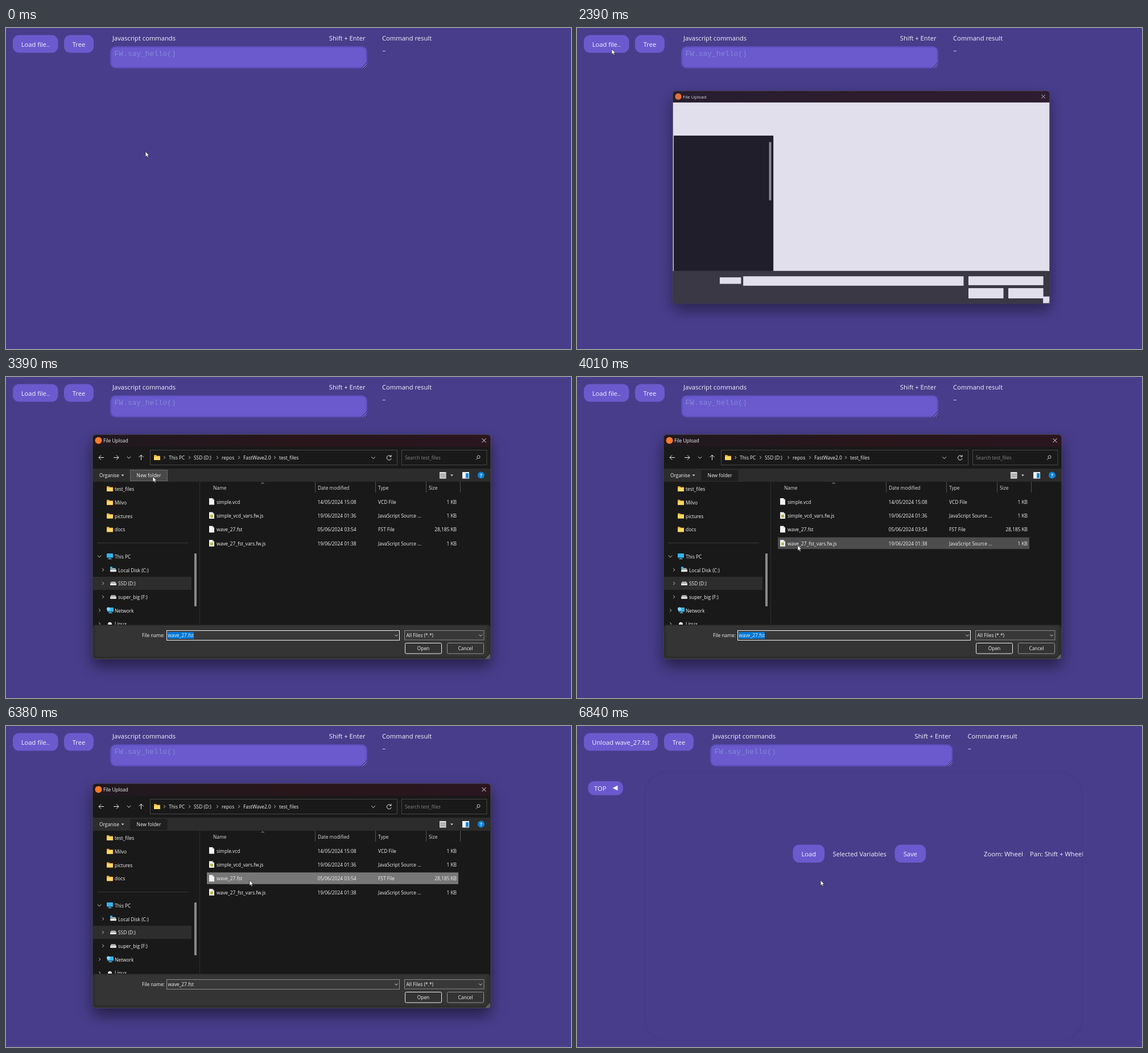
Write an HTML page that moves like this. It is 993x564 px and loops after 8000 ms.

```html
<!DOCTYPE html>
<html lang="en">
<head>
<meta charset="utf-8">
<title>Load a waveform file</title>
<style>
  html, body { margin: 0; width: 100%; height: 100%; overflow: hidden; background: #483d8b; }
  svg { display: block; }
  text { white-space: pre; }
  .page { font: 11.2px "Open Sans", "Noto Sans", sans-serif; fill: #f4f2fc; }
  .dialog { font: 8.4px "Open Sans", "Noto Sans", sans-serif; fill: #f2f2f2; }
  .code { font: 12.9px "Liberation Mono", monospace; fill: #8589d9; }
  .mid { text-anchor: middle; }
  .end { text-anchor: end; }
</style>
</head>
<body>
<svg id="stage" width="993" height="564" viewBox="0 0 993 564"></svg>
<script>
const LOOP = 8000;
const stage = document.getElementById('stage');
const $ = id => document.getElementById(id);

// Markup helpers
const rect = (x, y, w, h, fill, more = '') =>
  `<rect x="${x}" y="${y}" width="${w}" height="${h}" fill="${fill}" ${more}/>`;
const frame = (x, y, w, h, stroke, more = '') => rect(x, y, w, h, 'none', `stroke="${stroke}" ${more}`);
const circle = (x, y, r, fill) => `<circle cx="${x}" cy="${y}" r="${r}" fill="${fill}"/>`;
const text = (x, y, s, more = '') => `<text x="${x}" y="${y}" ${more}>${s}</text>`;
const line = (d, stroke = '#eee', more = '') => `<path d="${d}" fill="none" stroke="${stroke}" ${more}/>`;
const shape = (d, fill) => `<path d="${d}" fill="${fill}"/>`;
const group = (id, body, more = '') => `<g id="${id}" ${more}>${body}</g>`;

const right = (x, y, s = 2.5, c = '#ccc') => line(`M${x - s / 2} ${y - s}l${s} ${s}l${-s} ${s}`, c);
const down = (x, y, s = 3.2, c = '#ddd') => line(`M${x - s} ${y - s / 2}l${s} ${s}l${s} ${-s}`, c);
const caret = (x, y) => shape(`M${x - 2.5} ${y - 1}h5l-2.5 2.7z`, '#ddd');

// Page behind the dialog
const button = (x, y, w, h, label, id = '') =>
  rect(x, y, w, h, '#6a5acd', `rx="11" ${id && `id="${id}"`}`) + text(x + w / 2, y + 20.5, label, 'class="mid"');

function commandBar(x, w) {
  const end = x + w;
  return text(x + 3.5, 22, 'Javascript commands') +
    text(end - 3, 22, 'Shift + Enter', 'class="end"') +
    text(end + 26.5, 22, 'Command result') + text(end + 27, 42.5, '–') +
    rect(x, 32.5, w, 38, '#6a5acd', 'rx="9"') +
    frame(x + 1, 33.5, w - 2, 36, '#5d4fbf', 'rx="8" stroke-width="2"') +
    line(`M${end - 10} 70.5l10-10M${end - 6} 70.5l6-6M${end - 2} 70.5l2-2`, '#2b2450') +
    line(`M${end - 8} 70.5l8-8M${end - 4} 70.5l4-4`, '#a9a2dc', 'stroke-width=".6"') +
    text(x + 7, 48.5, 'FW.say_hello()', 'class="code"');
}

const emptyPage = button(12, 12.5, 79.5, 31, 'Load file..', 'loadButton') +
  button(102, 12.5, 52, 31, 'Tree') + commandBar(183.5, 451);

const loadedPage = button(12, 12.5, 130, 31, 'Unload wave_27.fst') +
  button(153, 12.5, 52, 31, 'Tree') + commandBar(234.5, 425.5) +
  rect(19.5, 97, 61.5, 24.5, '#6a5acd', 'rx="11"') + text(30, 113.5, 'TOP') +
  shape('M62.5 109l9-4.5v9z', '#f4f2fc') +
  button(379.5, 208.5, 55.5, 31.5, 'Load') + text(449.5, 229, 'Selected Variables') +
  button(558.5, 208.5, 54.5, 31.5, 'Save') +
  text(715, 229, 'Zoom: Wheel') + text(796, 229, 'Pan: Shift + Wheel') +
  frame(119, 80, 769, 474, '#43377f', 'rx="40" stroke-width="4" opacity=".3"');

// Dialog icons
const folder = (x, y) => shape(`M${x} ${y - 4.5}h4l1.5 1.5h5.5v7.5h-11z`, '#e8a92e') +
  rect(x, y - 2, 11, 6.5, '#ffd765', 'rx=".8"');
const drive = (x, y) => shape(`M${x + 2} ${y - 3}h7l2 3h-11z`, '#b5b5b5') + rect(x, y, 11, 3.5, '#e6e6e6', 'rx="1"');
const monitor = (x, y) => rect(x, y - 5, 11, 7.5, '#35b4ee', 'rx=".8"') +
  rect(x + 4.5, y + 2.5, 2, 2, '#1788c4') + rect(x + 2.5, y + 4, 6, 1, '#8ccdec');
const paper = (x, y, script) => shape(`M${x} ${y - 6}h6l3 3v8.5h-9z`, '#f3f3f3') +
  shape(`M${x + 6} ${y - 6}l3 3h-3z`, '#b9b9b9') + (script ? rect(x + 2, y - 1.5, 5, 5, '#b8b84a') : '');

const navigation = () => {
  const crumbs = [[286, 'This PC'], [330, 'SSD (D:)'], [379, 'repos'], [417, 'FastWave2.0'], [480, 'test_files']];
  return line('M172 141.5h-9m4-4l-4 4l4 4M189 141.5h9m-4-4l4 4l-4 4M237.5 146v-9m-4 4l4-4l4 4') +
    down(216, 141.5) + frame(253.5, 128.5, 434, 26, '#474747') + folder(260, 141.5) +
    crumbs.map(([x, s]) => right(x - 7.5, 141.5) + text(x, 145, s)).join('') +
    down(645.5, 142) + line('M676.5 139.5a4 4 0 1 0 .7 3.5M677 137v3h-3') +
    frame(695.5, 128.5, 149.5, 26, '#474747') + text(701, 145, 'Search test_files', 'fill="#858585"') +
    line('M826 145.5l3-3', '#ccc') + `<circle cx="830.5" cy="140.5" r="2.5" fill="none" stroke="#ccc"/>`;
};

const toolbar = () => rect(152.5, 161, 699, 23, '#2c2c2c') +
  text(164, 176, 'Organise') + caret(205, 172.5) +
  rect(218.5, 163.5, 65, 19, '#1f1f1f', 'id="newFolder"') + text(251, 176, 'New folder', 'class="mid"') +
  rect(762, 167, 11.5, 11.5, '#ddd') + line('M763 170.5h9.5M763 173h9.5M763 175.5h9.5', '#555', 'stroke-width=".8"') +
  caret(783.5, 172.5) + rect(802, 167, 12, 11.5, '#f1f1f1') + rect(808, 169, 5, 8.5, '#1888d8') +
  circle(835, 172.5, 6, '#0a84d8') + text(835, 175.7, '?', 'class="mid" font-weight="bold"');

function sidebar() {
  const row = i => 196.5 + i * 23.72;
  const label = (x, i, s) => text(x, row(i) + 3.7, s);
  const folders = ['test_files', 'Milvo', 'pictures', 'docs'];
  const drives = ['Local Disk (C:)', 'SSD (D:)', 'super_big (F:)'];
  return folders.map((s, i) => folder(177, row(i)) + label(191, i, s)).join('') +
    line('M160 291.5h160', '#3b3b3b') +
    down(164, row(5)) + monitor(177, row(5)) + label(191, 5, 'This PC') +
    rect(153, 351, 173, 23, '#2d2d2d') +
    drives.map((s, i) => right(170.5, row(i + 6)) + drive(183, row(i + 6)) + label(197, i + 6, s)).join('') +
    rect(183, row(6) - 5.5, 4, 4, '#35b4ee') +
    right(164.5, row(9)) + monitor(178, row(9)) + circle(180, row(9) - 2.5, 3, '#8ed4f4') + label(191, 9, 'Network') +
    right(164.5, row(10)) + circle(182.5, row(10) + .5, 3.5, '#e8e8e8') + label(191, 10, 'Linux') +
    rect(331, 310, 4, 93, '#8b8b8b', 'rx="1"') + line('M340.5 184v251', '#2f2f2f');
}

const rowY = i => 219 + i * 24.4;
function fileList() {
  const files = [
    ['simple.vcd', '14/05/2024 15:08', 'VCD File', '1 KB'],
    ['simple_vcd_vars.fw.js', '19/06/2024 01:36', 'JavaScript Source ...', '1 KB'],
    ['wave_27.fst', '05/06/2024 03:54', 'FST File', '28,185 KB'],
    ['wave_27_fst_vars.fw.js', '19/06/2024 01:38', 'JavaScript Source ...', '1 KB'],
  ];
  const header = [[364, 'Name'], [548, 'Date modified'], [654, 'Type'], [743, 'Size']];
  return header.map(([x, s]) => text(x, 198, s, 'fill="#ddd"')).join('') +
    line('M543.5 184v19M649.5 184v19M738.5 184v19M798.5 184v19', '#505050') +
    line('M448.5 187.5l2.5-2l2.5 2', '#aaa') +
    files.map(([name, date, type, size], i) => {
      const y = rowY(i), base = y + 3.5;
      return rect(353, y - 10.5, 442, 20.5, '#4d4d4d', `id="row${i}"`) + paper(357, y, name.endsWith('js')) +
        text(370, base, name) + text(547.5, base, date) + text(654, base, type) + text(792, base, size, 'class="end"');
    }).join('');
}

const footer = () => rect(152.5, 435.5, 699, 59.5, '#2e2e2e', 'rx="5"') + rect(157, 437, 688, 53.5, '#343434') +
  text(279, 457, 'File name:', 'class="end"') +
  rect(282.5, 445.5, 409, 17, '#383838', 'id="nameField"') + rect(284, 448, 46, 12, '#0078d7', 'id="nameMark"') +
  text(284.5, 457, 'wave_27.fst') + down(686, 454, 2.7) +
  rect(700.5, 445.5, 139.5, 16.5, '#383838', 'stroke="#8a8a8a"') + text(703.5, 457, 'All Files (*.*)') + down(834, 454, 2.7) +
  rect(701.5, 467.5, 64, 18.5, '#333', 'rx="2" stroke="#f0f0f0"') + text(733.5, 480, 'Open', 'class="mid"') +
  rect(775.5, 467.5, 64, 18.5, '#333', 'rx="2" stroke="#949494"') + text(807.5, 480, 'Cancel', 'class="mid"') +
  line('M849.5 488v7M847 490.5v4.5M844.5 493v2', '#aaa', 'stroke-width="1.6" stroke-dasharray="1.6 .9"');

// Unpainted controls shown while the dialog opens
const skeleton = () => rect(152.5, 122.5, 699, 313, '#fff') + rect(154, 184, 185, 251.5, '#191919') +
  rect(331, 196, 4, 108, '#9b9b9b') + rect(152.5, 435, 699, 60, '#383838', 'rx="5"') +
  [[239.5, 447, 39.5, 12], [283, 445, 409, 17.5], [701, 445, 139, 16.5], [701, 467, 65, 19],
    [775, 467, 65, 19], [839.5, 482.5, 12, 12.5]].map(box => rect(...box, '#fff')).join('');

const tooltip = () => rect(432.5, 286.5, 137, 36, '#2b2b2b', 'stroke="#505050" rx="2"') +
  ['Type: FST File', 'Size: 27.5 MB', 'Date modified: 05/06/2024 03:54']
    .map((s, i) => text(436, 297 + i * 10.7, s, 'font-size="8"')).join('');

const dialog = rect(152, 113, 700, 395, '#000', 'rx="8" opacity=".5" filter="url(#blur)"') +
  rect(152, 101, 700, 394.5, '#191919', 'rx="6"') +
  shape('M152 122.5v-15.500a6 6 0 0 1 6-6h688a6 6 0 0 1 6 6v15.500z', 'url(#titleBar)') +
  circle(162.5, 111.5, 6, '#ff7a2b') + text(171, 115, 'File Upload') + line('M836.500 108l7 7m0-7l-7 7') +
  group('skeleton', skeleton()) +
  group('content', navigation() + toolbar() + group('side', sidebar(), 'clip-path="url(#panel)"') + fileList() + footer()) +
  frame(152, 101, 700, 394.5, '#55505a', 'rx="6" stroke-width=".8"') + group('tooltip', tooltip());

stage.innerHTML = `<defs>
    <filter id="blur" x="-20%" y="-20%" width="140%" height="140%"><feGaussianBlur stdDeviation="13"/></filter>
    <linearGradient id="titleBar"><stop stop-color="#20191f"/><stop offset=".5" stop-color="#28161b"/><stop offset="1" stop-color="#2a161f"/></linearGradient>
    <clipPath id="panel">${rect(152, 184, 189, 251, '#fff')}</clipPath>
  </defs>` +
  rect(0, 0, 993, 564, '#483d8b') +
  group('emptyPage', emptyPage, 'class="page"') + group('loadedPage', loadedPage, 'class="page"') +
  group('dialog', dialog, 'class="dialog"') +
  group('cursor', '<path d="M0 0v9.500l2.200-2l1.500 3.300l1.600-.7l-1.500-3.200h3z" fill="#fff" stroke="#1a1a2a" stroke-width=".7"/>');

// Pointer moves: start, end, number of steps, then points [progress, x, y]
const moves = [
  [660, 1420, 12, [.75, 118, 93], [1, 80, 59]],
  [1490, 1980, 8, [.6, 66, 42], [1, 61, 37]],
  [2900, 3680, 12, [2 / 3, 258, 175], [1, 341, 449]],
  [3730, 4220, 8, [.25, 330, 415], [.8, 415, 240], [1, 432, 262]],
  [4430, 4630, 4, [1, 430, 265]],
  [4770, 4980, 4, [1, 432, 273]],
  [5840, 6050, 4, [1, 428, 271]],
];
const clamp = v => Math.max(0, Math.min(1, v));

function cursorAt(t) {
  let x = 245, y = 217;
  for (const [start, end, steps, ...points] of moves) {
    if (t < start) break;
    const progress = clamp(Math.floor((t - start) / (end - start) * (steps - 1) + 1.2) / steps);
    let last = 0;
    for (const [stop, px, py] of points) {
      const part = clamp((progress - last) / (stop - last));
      x += (px - x) * part;
      y += (py - y) * part;
      if (part < 1) break;
      last = stop;
    }
  }
  return [x, y];
}

// Dialog phases: start, scale, opacity
const phases = [
  [0, 1, 0], [2390, .947, .84], [2450, .98, .95], [2520, .996, 1], [2580, 1, 1],
  [6510, .97, .6], [6580, .95, .25], [6660, 1, 0],
];

const show = (id, on) => { $(id).style.display = on ? '' : 'none'; };
const set = (id, name, value) => $(id).setAttribute(name, value);

function draw(t) {
  const [x, y] = cursorAt(t);
  set('cursor', 'transform', `translate(${x} ${y})`);
  show('emptyPage', t < 6840);
  show('loadedPage', t >= 6840);
  const overLoad = x >= 12 && x < 91 && y >= 13 && y < 43 && t < 1980;
  set('loadButton', 'fill', overLoad ? '#7b68ee' : '#6a5acd');

  const [, scale, opacity] = phases.findLast(([start]) => t >= start);
  show('dialog', opacity > 0);
  set('dialog', 'opacity', opacity);
  set('dialog', 'transform', `translate(455 280) scale(${scale}) translate(-455 -280)`);
  show('skeleton', t < 2520);
  show('content', t >= 2520);

  const overNew = x >= 218 && x < 284 && y >= 163 && y < 183;
  set('newFolder', 'fill', overNew ? '#484848' : '#1f1f1f');
  set('newFolder', 'stroke', overNew ? '#686868' : 'none');
  const selected = t >= 4430;
  for (let i = 0; i < 4; i++) {
    const over = x >= 353 && x < 795 && Math.abs(y - rowY(i)) < 11;
    show('row' + i, over || (selected && i === 2));
  }
  set('row2', 'fill', selected ? '#777' : '#4d4d4d');
  show('nameMark', !selected);
  const level = Math.round(245 - 105 * clamp((t - 4430) / 200));
  set('nameField', 'stroke', `rgb(${level},${level},${level})`);
  const tipOpacity = t < 6310 ? clamp((t - 5770) / 280) : 0;
  set('tooltip', 'opacity', t >= 5840 ? tipOpacity : 0);
}

const began = performance.now();
function tick() {
  draw((performance.now() - began) % LOOP);
  requestAnimationFrame(tick);
}
tick();
</script>
</body>
</html>
```
